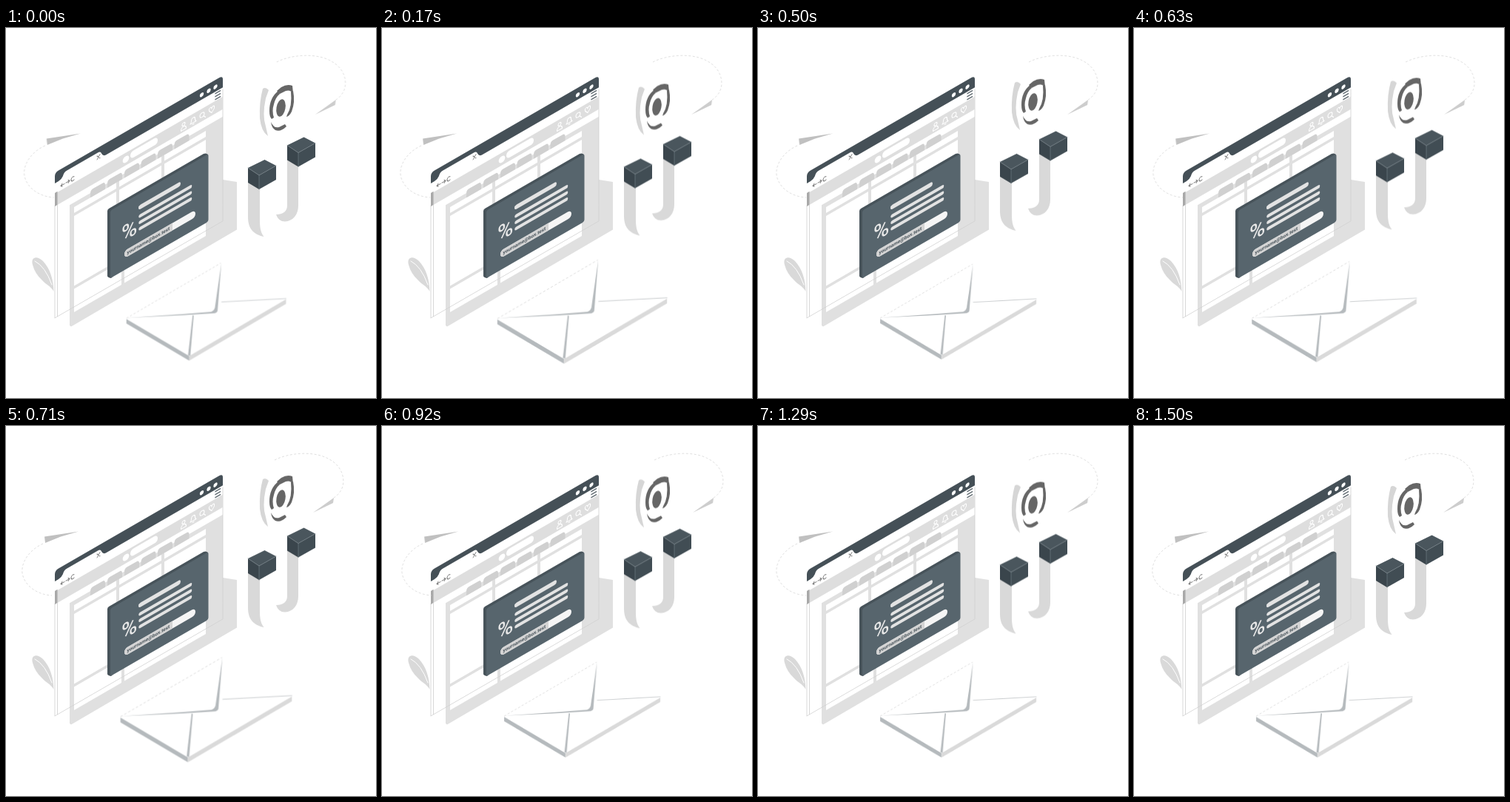
These frames come from a looping animation (500x500 px, 1.54 s). An HTML page:

```html
<!DOCTYPE html>
<html lang="en">
<head>
<meta charset="utf-8">
<title>Mail offer</title>
<style>
html, body { margin: 0; width: 100%; height: 100%; overflow: hidden; background: #fff; }
svg { display: block; width: 100vw; height: 100vh; }
.float, .shake, .beat { animation: float 1540ms -40ms ease-in-out infinite; }
.shake { animation-name: shake; animation-timing-function: linear; }
.beat { animation-name: beat; animation-timing-function: linear; transform-origin: 270.5px 383px; }
@keyframes float { 50% { transform: translateY(-10px); } }
@keyframes shake {
  10%, 90% { transform: translateX(-1px); }
  20%, 80% { transform: translateX(2px); }
  30%, 50%, 70% { transform: translateX(-4px); }
  40%, 60% { transform: translateX(4px); }
}
@keyframes beat {
  0%, 25%, 37%, 61%, 100% { transform: scale(1); }
  12%, 49% { transform: scale(1.1); }
}
.line { fill: none; stroke-linecap: round; stroke-linejoin: round; }
.dash { fill: none; stroke: #d2d2d2; stroke-width: .7; stroke-dasharray: 3 2.5; }
</style>
</head>
<body>
<svg viewBox="0 0 500 500">
  <defs>
    <g id="cube">
      <path fill="#4a565d" d="M0 11 22.500 0 38 8 15 21Z"/>
      <path fill="#3a454c" d="M0 11 15 21V40L0 31Z"/>
      <path fill="#414d54" d="M15 21 38 8V27L15 40Z"/>
      <path class="line" stroke="#78838a" stroke-width=".6" d="M0 11 15 21 38 8M15 21V40"/>
    </g>
    <path id="tab" fill="#d0d0d0" d="M0 10V4Q0 0 4 0H16Q20 0 20 4V10Z"/>
  </defs>

  <path fill="#d9d9d9" d="M36 320C33 309 42 307 50 315C60 326 64 340 64.500 356C60 348 54 347 49 341Q39 332 36 320Z"/>
  <path class="line" stroke="#fff" stroke-width="1" d="M39 315Q53 322 62 347"/>

  <!-- browser window: skewed plane, x as on screen -->
  <path fill="#e0e0e0" d="M293 205 312 208V272.500L88 403.500 86 402V381L293 262Z"/>
  <g transform="skewY(-30)">
    <path fill="#e0e0e0" d="M86 289H293V433H86Z"/>
    <g fill="#fff">
      <path d="M92 295H149V303H92ZM153 295H210V303H153ZM214 295H270V303H214Z"/>
      <path d="M92 307H149V401.500H92ZM153 307H210V401.500H153ZM214 307H270V401.500H214Z"/>
      <path d="M92 405.500H156V437H92ZM160 405.500H270V437H160Z"/>
    </g>
    <path class="line" stroke="#cfcfcf" stroke-width=".8" d="M66 278V430H293V252M69.500 279V430"/>
    <path fill="#dedede" d="M66 262H293V279H66Z"/>
    <path fill="#a8a8a8" d="M66 261H69.500V279H66Z"/>
    <path fill="#455057" d="M66 248V238.500Q66 233.500 71 233.500H288Q293 233.500 293 238.500V249.500H135Q131 249 129 244Q128 240 124 240H82Q78 240 77 244.500Q75 248 71 248Z"/>
    <g fill="#fff">
      <circle cx="264.500" cy="243" r="2.700"/><circle cx="274" cy="243" r="2.700"/><circle cx="283" cy="243" r="2.700"/>
      <circle cx="162" cy="271" r="4.300"/>
      <rect x="168" y="265" width="37" height="9.500" rx="4.700"/>
    </g>
    <g class="line" stroke="#777" stroke-width="1">
      <path d="M123 244 127 249M127 244 123 249"/>
      <path d="M79 256H74M76 254 74 256 76 258M81 256H86M84 254 86 256 84 258M92 254A2.300 2.800 0 1 0 92 258"/>
      <path stroke="#566168" stroke-width="1.500" d="M283 252H289.500M283 256H289.500M283 260H289.500"/>
    </g>
    <g class="line" stroke="#fff" stroke-width="1.100">
      <circle cx="240" cy="268.500" r="2"/>
      <path d="M236.500 276Q236.500 271.500 240 271.500T243.500 276Z"/>
      <path d="M249 274Q250.500 273 250.500 270Q250.500 267 253 267T255.500 270Q255.500 273 257 274ZM252 276H254"/>
      <circle cx="265" cy="270.500" r="3"/><path d="M267.200 273 269.500 276"/>
      <path d="M278 275 274.700 271Q273.700 267 276.300 267 278 267.500 278 269.500 278 267.500 279.700 267 282.300 267 281.300 271Z"/>
    </g>
    <use href="#tab" x="114" y="285"/><use href="#tab" x="137" y="285"/><use href="#tab" x="160" y="285"/>
    <use href="#tab" x="182.500" y="285"/><use href="#tab" x="205" y="285"/><use href="#tab" x="227.500" y="285"/>
  </g>

  <!-- offer card -->
  <path fill="#47535a" d="M137 247.500Q137 245 139 244L267 170Q270.500 168.500 273 171V180L145 250V335L142 338Q137 337 137 335Z"/>
  <g transform="skewY(-30)">
    <rect x="141" y="328" width="132.500" height="91.500" rx="2.500" fill="#57656d"/>
    <text x="156" y="379.500" font-family="Roboto, sans-serif" font-size="29" font-weight="500" fill="#e8e8e8">%</text>
    <g class="line" stroke="#e3e3e3" stroke-width="4.500">
      <path stroke-width="6" d="M182 346.500H233"/>
      <path d="M181.500 358.500H249M181.500 367H249M181.500 375.500H249"/>
    </g>
    <rect x="160" y="393.500" width="96" height="10" rx="5" fill="#f5f5f5"/>
    <path fill="#d4d4d4" d="M225 393.500V403.500H165A5 5 0 0 1 165 393.500Z"/>
    <text x="163.500" y="400.500" font-family="Roboto, sans-serif" font-size="6.400" font-weight="700" fill="#4b565d">yourname@box.test</text>
  </g>

  <!-- flight paths -->
  <g class="shake">
    <path class="dash" d="M53 159C35 167 23 184 25 199C28 216 45 228 65 229"/>
    <path fill="#c0c0c0" d="M55 149.500 101 142.500 77 149.500 56 158Z"/>
    <path class="dash" d="M366 46C385 36 420 33 440 45C459 55 463 76 455 88Q451 94 446 97"/>
    <path fill="#cdcdcd" d="M446 97 418 117 445 104Z"/>
  </g>

  <!-- at sign -->
  <g class="float">
    <path fill="#d6d6d6" d="M347 82Q351 79 355 84L351 95Q346 118 351 133L354 146Q345 140 343 122 342 100 347 82Z"/>
    <g fill="#666">
      <path d="M368 85Q356 94 356 112 356 120 359 123L362 121Q359 112 362 103 364 94 370 89Z"/>
      <path d="M366 85 372 80Q380 75 387 78L388 88Q384 83 378 85L370 89Z"/>
      <path d="M385 86 388 85Q391 100 386 113 383 119 379 120L380 117Q387 106 385 86Z"/>
      <path d="M358 127Q362 136 369 134L377 130 379 133Q371 141 364 138 359 135 358 127Z"/>
      <ellipse cx="371.500" cy="108" rx="6" ry="12" transform="rotate(10 371.500 108)"/>
    </g>
  </g>

  <!-- magnet -->
  <g class="float">
    <g fill="#d9d9d9">
      <path d="M327 206V255C327 272 335 279 348.500 282C343 275 343 266 343 258V213Z"/>
      <path d="M380 176V240C380 248 374 252 365 252Q368 261.500 377 261.500C388 261 395 252 395 240V182Z"/>
    </g>
    <use href="#cube" x="327" y="178"/>
    <use href="#cube" x="380" y="147.500"/>
  </g>

  <!-- envelope -->
  <g class="beat">
    <path fill="#fff" d="M165 393 290 319 376 367 248 442Z"/>
    <path fill="#b5babd" d="M165 393 248 442V448L165 399Z"/>
    <path fill="#dadada" d="M248 442 376 367V373L248 448Z"/>
    <path class="dash" d="M165 392 290 319"/>
    <path fill="#b5babd" d="M165 391.500 240 386.500 277 383.500Q281 382 282 378L290.500 319 285.500 382Q285 385 280 385.500L240 388Z"/>
    <path fill="#b5babd" d="M252.500 388 254 388.500 249.500 441.500 246.500 441Z"/>
    <path class="line" stroke="#c3c7c9" stroke-width=".8" d="M291 370.500 376 366"/>
  </g>
</svg>
</body>
</html>
```
